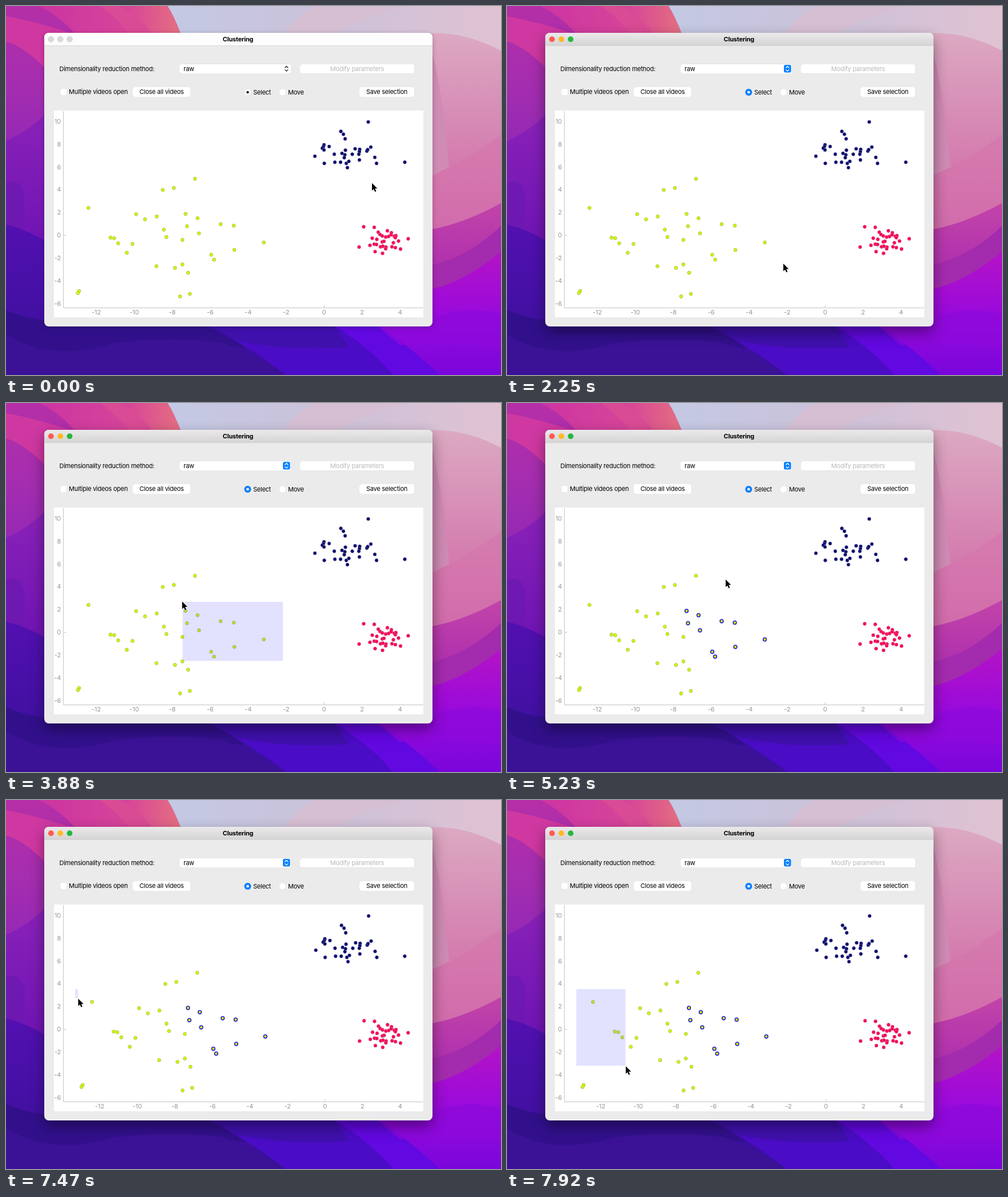
Animation, 867 px wide and 646 px high, one loop 8 s. Source, as an HTML page:

```html
<!DOCTYPE html>
<html lang="en">
<head>
<meta charset="utf-8">
<title>Clustering</title>
<style>
html, body { margin: 0; height: 100%; overflow: hidden; }
svg { display: block; width: 100vw; height: 100vh; font: 11px Inter, sans-serif; letter-spacing: -.25px; }
.mid { text-anchor: middle; }
.end { text-anchor: end; }
.axis { fill: #959595; letter-spacing: 0; }
.field { fill: #fff; filter: drop-shadow(0 .5px .6px rgba(0,0,0,.28)); }
#frame { fill: #ebebeb; filter: drop-shadow(0 2px 4px rgba(0,0,0,.25)); }
.on #frame { filter: drop-shadow(0 10px 12px rgba(0,0,0,.42)); }
#bar { fill: #fdfdfd; }
.on #bar { fill: url(#barTone); }
.lamp { fill: #dadada; stroke: #c6c6c6; stroke-width: .7; }
.on .lamp { fill: var(--c); stroke: none; }
#knob { fill: none; }
.on #knob { fill: #0a82ff; }
#arrows { fill: none; stroke: #222; stroke-width: 1.3; stroke-linecap: round; stroke-linejoin: round; }
.on #arrows { stroke: #fff; }
.on #radio { fill: #0a82ff; }
.on #bullet { fill: #fff; }
</style>
</head>
<body>
<svg id="stage" viewBox="0 0 867 646" preserveAspectRatio="none">
  <defs>
    <linearGradient id="barTone" x2="0" y2="1"><stop stop-color="#ebe9ea"/><stop offset="1" stop-color="#d5d4d5"/></linearGradient>
    <linearGradient id="left" x2="0" y2="1"><stop stop-color="#b52fa7"/><stop offset=".5" stop-color="#a32db0"/><stop offset="1" stop-color="#8b25b8"/></linearGradient>
    <linearGradient id="violet" x2="0" y2="1"><stop stop-color="#8a22b8"/><stop offset="1" stop-color="#6c12b4"/></linearGradient>
    <linearGradient id="indigo" x2="0" y2="1"><stop stop-color="#5210b0"/><stop offset="1" stop-color="#38109a"/></linearGradient>
    <linearGradient id="coral"><stop stop-color="#cc34a2"/><stop offset=".6" stop-color="#d64499"/><stop offset="1" stop-color="#e5717f"/></linearGradient>
    <linearGradient id="sky"><stop stop-color="#c4c9e4"/><stop offset=".45" stop-color="#cbc2da"/><stop offset="1" stop-color="#e0c2d2"/></linearGradient>
    <linearGradient id="rose" x2="0" y2="1"><stop stop-color="#dca9c2"/><stop offset=".6" stop-color="#d47cae"/><stop offset="1" stop-color="#cb58a8"/></linearGradient>
    <linearGradient id="plum" x2="0" y2="1"><stop stop-color="#c244a8"/><stop offset="1" stop-color="#a526b2"/></linearGradient>
    <linearGradient id="vivid" x2="0" y2="1"><stop stop-color="#b513c6"/><stop offset=".5" stop-color="#990adb"/><stop offset="1" stop-color="#7a06dc"/></linearGradient>
  </defs>

  <g id="wall">
    <path fill="url(#left)" d="M0 0H400V300H0Z"/>
    <path fill="#cf38a1" d="M0 18Q60 28 150 60L70 110Q30 70 0 62Z"/>
    <path fill="url(#coral)" d="M58 0H283Q298 25 310 60H130Q100 20 58 0Z"/>
    <path fill="#d94b94" d="M165 0H200Q240 20 262 60H225Q200 25 165 0Z"/>
    <path fill="url(#sky)" d="M283 0H867V120H330Q305 35 283 0Z"/>
    <path fill="#d6bfd3" d="M540 0H700Q620 20 560 60H480Q500 25 540 0Z"/>
    <path fill="url(#rose)" d="M690 60Q770 28 867 78V420H690Z"/>
    <path fill="#cf8bb4" d="M740 60Q765 140 776 282L740 300Z"/>
    <path fill="#d576ad" d="M740 300Q800 275 867 225V400H740Z" opacity=".6"/>
    <path fill="url(#plum)" d="M740 392Q800 382 867 345V520H740Z"/>
    <path fill="#a32bae" d="M740 455Q810 440 867 385V520H740Z"/>
    <path fill="url(#violet)" d="M0 236Q40 220 80 178V450H0Z"/>
    <path fill="#681ab0" d="M0 310Q25 300 32 330Q34 370 29 400L0 390Z" opacity=".6"/>
    <path fill="url(#indigo)" d="M0 383Q40 392 80 418V550H760V646H0Z"/>
    <path fill="#32108c" d="M0 532Q50 555 110 550H340Q390 575 420 600Q300 578 205 612Q110 650 0 590Z"/>
    <path fill="#3b1296" d="M0 575Q80 625 190 590Q300 578 380 590Q430 610 490 646H0Z"/>
    <path fill="#4a0cc4" d="M340 552H640L700 646H490Q420 592 340 552Z"/>
    <path fill="#3f10ac" d="M340 552H570L600 597Q500 605 405 586Z"/>
    <path fill="#6208e0" d="M558 550H780V646H678Q630 590 558 550Z"/>
    <path fill="url(#vivid)" d="M740 497Q800 485 867 430V646H760Q700 590 640 550H740Z"/>
    <path fill="#8d09dc" d="M740 552Q800 520 867 540V600Q800 580 690 594L650 560Z" opacity=".7"/>
  </g>

  <rect id="frame" x="67" y="47" width="680" height="514" rx="8"/>
  <path id="bar" d="M67 69.5V55a8 8 0 0 1 8-8H739a8 8 0 0 1 8 8V69.5Z"/>
  <path d="M67 69.5H747" stroke="#d0d0d0" stroke-width=".8"/>
  <circle class="lamp" style="--c:#ff5a52" cx="78.8" cy="58.2" r="4.9"/>
  <circle class="lamp" style="--c:#fdb924" cx="95.2" cy="58.2" r="4.9"/>
  <circle class="lamp" style="--c:#25b93c" cx="111.5" cy="58.2" r="4.9"/>
  <text class="mid" x="406.3" y="61.8" font-weight="700">Clustering</text>

  <text x="93.5" y="114">Dimensionality reduction method:</text>
  <rect class="field" x="304" y="101.5" width="195.5" height="16.5" rx="4"/>
  <text x="311" y="113.7">raw</text>
  <rect id="knob" x="485" y="103" width="12.6" height="13.6" rx="3"/>
  <path id="arrows" d="M488.8 108l2.5-2.5 2.5 2.5M488.8 111.6l2.5 2.5 2.5-2.5"/>
  <rect class="field" x="515" y="102" width="200.5" height="16.5" rx="4"/>
  <text class="mid" x="615" y="114" fill="#b9b9b9">Modify parameters</text>

  <rect class="field" x="95.2" y="144.5" width="11.5" height="11.5" rx="2.5"/>
  <text x="110" y="154.3">Multiple videos open</text>
  <rect class="field" x="222" y="142" width="101.5" height="17" rx="4"/>
  <text class="mid" x="272.5" y="154.3">Close all videos</text>
  <circle class="field" id="radio" cx="423.3" cy="151" r="6"/>
  <circle id="bullet" cx="423.3" cy="151" r="2.3" fill="#222"/>
  <text x="433" y="154.8">Select</text>
  <circle class="field" cx="484.3" cy="151" r="6"/>
  <text x="494" y="154.8">Move</text>
  <rect class="field" x="619" y="142" width="96.5" height="17" rx="4"/>
  <text class="mid" x="667" y="154.3">Save selection</text>

  <rect x="84" y="183" width="647" height="362" fill="#fff"/>
  <path d="M100.5 184V528.5H730.5M100.5 401.5H105" fill="none" stroke="#c4c4c4"/>
  <g id="plot"></g>
  <rect id="drag" fill="rgba(100,100,255,.19)"/>
  <path id="cursor" d="M0 0V13.2L3 10.4 5.2 15.2 7.4 14.2 5.2 9.6H9.4Z" stroke="#fff" stroke-width="1.1" paint-order="stroke"/>
</svg>
<script>
const $ = id => document.getElementById(id);
const plot = $('plot');
const movers = [];
let picked = [];

function add(tag, attrs, text = '') {
  const el = document.createElementNS('http://www.w3.org/2000/svg', tag);
  for (const k in attrs) el.setAttribute(k, attrs[k]);
  el.textContent = text;
  return plot.appendChild(el);
}
const follow = (el, attr, x) => { movers.push({ el, attr, x }); return el; };

for (let v = -6; v <= 10; v += 2)
  add('text', { class: 'axis end', x: 96.3, y: 405.2 - v * 19.93 }, v);
for (let v = -12; v <= 4; v += 2) {
  const x = 557.2 + v * 33.25;
  follow(add('text', { class: 'axis mid', y: 539.8 }, v), 'x', x);
}
follow(add('rect', { y: 524, width: 1, height: 4, fill: '#c4c4c4' }), 'x', 556.8);

function dots(points, fill, stroke) {
  const made = [];
  for (let i = 0; i < points.length; i += 2)
    made.push(follow(add('circle', { cy: points[i + 1], r: 2.9, fill, stroke, 'stroke-width': .8 }), 'cx', points[i]));
  return made;
}

dots([331,302.5, 294,318.5, 274.5,322, 144.5,353.5, 228,364.5, 264,368.5, 243.5,373.5, 276.5,391.5,
  281,404.5, 183,405.5, 189.5,406.5, 196.5,415.5, 221.5,416.5, 211.5,432, 263.5,455.5, 296,458.5,
  309,452.5, 319,467, 322,504, 305,508.5, 128,499, 126,502.5, 309,409.5], '#d4f804', '#a3b54a');
picked = dots([314.5,364, 335.5,371.5, 317,385.5, 338,398, 376,382, 399,384.5, 451.5,414, 400,427,
  359.5,435.5, 364.5,444], '#d4f804', '#a3b54a');
dots([634.5,203, 586.5,219.5, 591,224.5, 594,232.5, 557,243, 556,246, 554,249, 557,252, 566,246,
  575,259.5, 588.5,258, 594.5,252.5, 593.5,260.5, 592.5,265.5, 606.5,259.5, 611.5,250, 619.5,251,
  619,255, 618,259.5, 619,269.5, 632,254, 633.5,251.5, 639,247, 646,265, 649,275.5, 541,263,
  557.5,275.5, 576,273.5, 586,273.5, 596,275.5, 600.5,272, 598,283, 698.5,273.5], '#00006a', '#6c6ca0');
dots([626.5,386.5, 645,387.5, 668,393.5, 675,397, 652,396, 655,400, 659,402.5, 665,404.5, 670,403.5,
  674.5,400.5, 680,403, 683,402, 682,405.5, 704.5,407.5, 641.5,406.5, 649.5,408.5, 659,413, 662,412,
  678.5,414.5, 687.5,411.5, 618.5,422, 637.5,419, 645,417, 649,417.5, 656,421.5, 660,420.5, 665.5,422,
  665,425, 676,421.5, 682,423, 691,425.5, 646.5,430, 659.5,433], '#fa0058', '#d8608a');

// Cursor path: time, x, y
const path = [
  [0, 641, 310], [1499, 641, 310], [1500, 639.5, 310], [1650, 622, 326], [2100, 497, 440], [2246, 484, 451],
  [2400, 485, 452], [2550, 478, 446], [3440, 318, 356], [3590, 313, 352], [3880, 308.5, 347.5],
  [4490, 308.5, 347.5], [4780, 330, 334], [5080, 379, 312], [5230, 383, 309],
  [5980, 383, 309], [6280, 362, 311], [7020, 136, 330], [7170, 119, 331], [7320, 115, 331],
  [7470, 126, 347], [7770, 192, 445], [7919, 208, 466], [8000, 208, 466]
];

function cursorAt(t) {
  const i = Math.max(1, path.findIndex(k => k[0] >= t));
  const [a, b] = [path[i - 1], path[i]];
  const p = (t - a[0]) / (b[0] - a[0]);
  return [a[1] + (b[1] - a[1]) * p, a[2] + (b[2] - a[2]) * p];
}

const rescale = x => 690 - (690 - x) * .9889;

function box(x0, y0, x1, y1) {
  const d = $('drag');
  d.setAttribute('x', Math.min(x0, x1));
  d.setAttribute('y', Math.min(y0, y1));
  d.setAttribute('width', Math.abs(x1 - x0));
  d.setAttribute('height', Math.abs(y1 - y0));
}

function draw(t) {
  const step = 149.3;
  const held = t < 1500 ? 0 : 1500 + Math.floor((t - 1490) / step) * step;
  const [x, y] = cursorAt(held);
  const first = t >= 2550 && t < 4180, second = t >= 7465;
  const chosen = t >= 4180;

  $('stage').classList.toggle('on', t >= 2250);
  $('cursor').setAttribute('transform', `translate(${x} ${y})`);
  for (const m of movers) m.el.setAttribute(m.attr, second ? rescale(m.x) : m.x);
  for (const el of picked) {
    el.setAttribute('stroke', chosen ? '#1c1cd8' : '#a3b54a');
    el.setAttribute('stroke-width', chosen ? 1.5 : .8);
  }
  if (first) box(485, 451.5, x + .8, y + .5);
  else if (second) box(rescale(115), 331, x - .5, y - .7);
  else box(0, 0, 0, 0);
}

function tick() {
  draw(performance.now() % 8000);
  requestAnimationFrame(tick);
}
tick();
</script>
</body>
</html>
```
